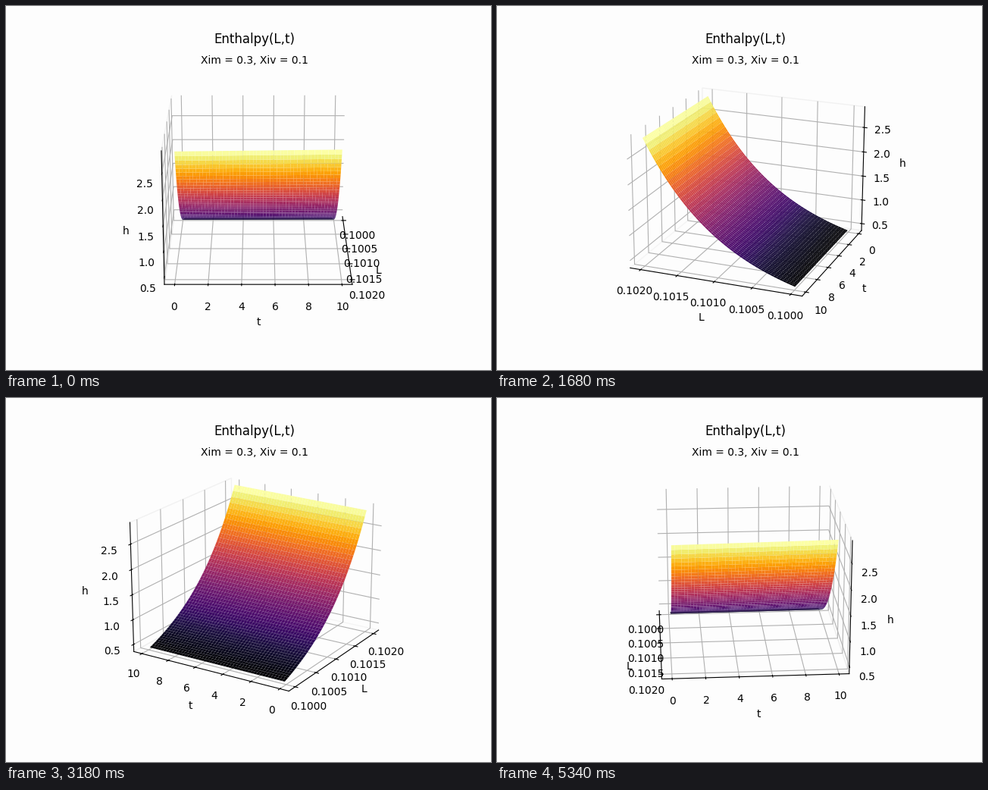
A matplotlib script that plays this animation: 640x480 px, repeating every 5400 ms.

```python
import numpy as np
import matplotlib.pyplot as plt
from matplotlib.animation import FuncAnimation
from mpl_toolkits.mplot3d import proj3d

FRAMES = 90
STEP = 360 / FRAMES
ELEV = 20
BACK = "#fdfdfd"
T_MIN, T_MAX = 0.1, 9.9
H_MIN, H_MAX, H_DRIFT = 0.404, 2.87, 0.0122
GROWTH = 1.92
EDGE = 25 / 24      # room between the limits and the box edges
LABEL_OUT = 1.361   # distance of axis labels from the centre, in half ranges


def padded(lo, hi, factor):
    mid, half = (lo + hi) / 2, (hi - lo) / 2 * factor
    return mid - half, mid + half


def enthalpy(length, time):
    u = (length - 0.1) / 0.002
    v = (time - T_MIN) / (T_MAX - T_MIN)
    top = H_MAX / (1 + H_DRIFT)
    rise = np.expm1(GROWTH * u) / np.expm1(GROWTH)
    return (H_MIN + (top - H_MIN) * rise) * (1 + H_DRIFT * v)


fig = plt.figure(figsize=(6.4, 4.8), dpi=100, facecolor=BACK)
ax = fig.add_subplot(projection="3d")
ax.set_facecolor(BACK)

L, T = np.meshgrid(np.linspace(0.1, 0.102, 50), np.linspace(T_MIN, T_MAX, 50))
ax.plot_surface(L, T, enthalpy(L, T), cmap="inferno", rcount=50, ccount=50)

x_lim = padded(0.1, 0.102, 1.1 * EDGE)
y_lim = padded(T_MIN, T_MAX, 1.1 * EDGE)
z_lim = padded(H_MIN, H_MAX, EDGE)
ax.set_xlim(*x_lim)
ax.set_ylim(*y_lim)
ax.set_zlim(*z_lim)
ax.set_xlabel("L")
ax.set_ylabel("t")
ax.set_zlabel("h")
for axis in (ax.xaxis, ax.yaxis, ax.zaxis):
    axis.pane.fill = False
ax.xaxis.pane.set_edgecolor("none")

ax.set_title("Enthalpy(L,t)", y=1.0)
ax.title.set_y(1.0)  # 3D axes lower the title on their own
ax.text2D(0.5, 0.95, "Xim = 0.3, Xiv = 0.1", transform=ax.transAxes, ha="center")
scale_text = fig.text(0, 0, "1e\N{MINUS SIGN}6", ha="right", va="center",
                      rotation_mode="anchor")


def project_edge(side, reach, z):
    """Project a point on the left vertical edge, pushed out by reach."""
    x = padded(*x_lim, reach)[1 if side > 0 else 0]
    y = padded(*y_lim, reach)[0 if side > 0 else 1]
    px, py, _ = proj3d.proj_transform(x, y, z, ax.get_proj())
    return float(px), float(py)


def place_scale_text(azim):
    scale_text.set_visible(45 < azim % 180 < 90)
    if not scale_text.get_visible():
        return
    side = 1 if azim < 180 else -1
    x0, y0 = project_edge(side, 1, z_lim[0])
    x1, y1 = project_edge(side, 1, z_lim[1])
    angle = np.degrees(np.arctan2(y1 - y0, x1 - x0))
    scale_text.set_rotation((angle + 90) % 180 - 90)
    # the projected x acts as a fraction of the square axes, 369.6 px wide
    px, _ = project_edge(side, LABEL_OUT, z_lim[0])
    scale_text.set_position(((143.2 + 369.6 * px) / 640, 0))


def update(i):
    azim = i * STEP + 0.01  # keeps the visible walls definite at right angles
    ax.view_init(elev=ELEV, azim=azim)
    place_scale_text(azim)
    return []


def init():
    return update(0)


anim = FuncAnimation(fig, update, frames=FRAMES, init_func=init, interval=60,
                     repeat=True, repeat_delay=0, blit=False)
plt.show()
```
